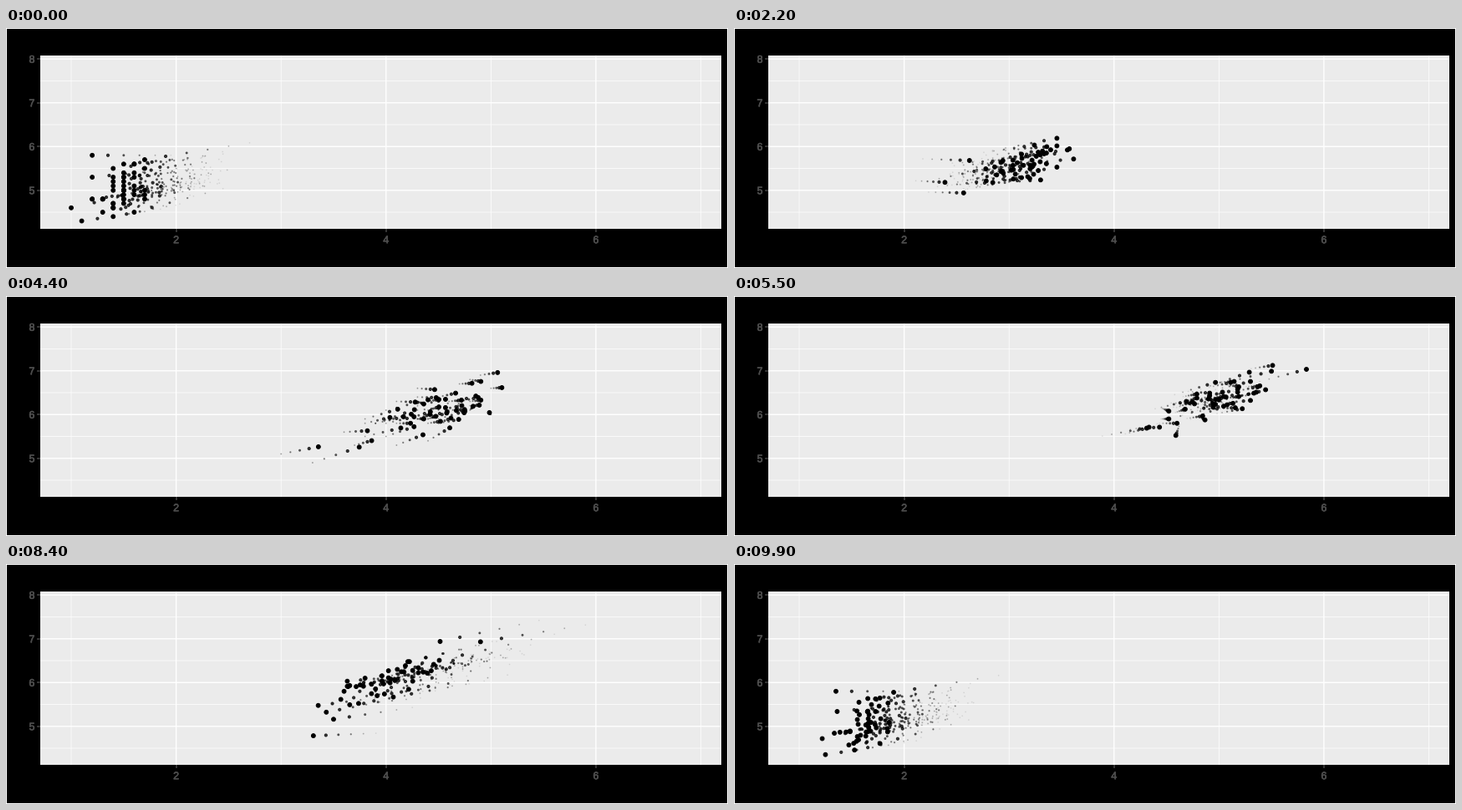
A matplotlib script for the animation above (10000 ms loop, 864 by 288 pixels).

```python
import numpy as np
import matplotlib.pyplot as plt
from matplotlib.animation import FuncAnimation
from matplotlib.patches import Rectangle
from matplotlib.patheffects import withStroke

W, H, DPI = 864, 288, 96
FRAMES, INTERVAL = 100, 100
LEFT, TOP, RIGHT, BOTTOM = 41, 33, 856, 241
COUNT = 50
WAKE = 5          # trailing copies behind each point
MOVES = ((6, 33), (40, 67), (74, 100))
GREY = "#4d4d4d"

plt.rcParams["font.family"] = "Liberation Sans"
rng = np.random.default_rng(4)


def cloud(mean, spread, corr, rim):
    """Correlated points on a 0.1 grid, after the outlying ones in rim."""
    u, v = rng.normal(size=(2, COUNT - len(rim))).clip(-1.8, 1.8)
    v = corr * u + np.sqrt(1 - corr ** 2) * v
    core = np.array(mean) + np.column_stack([u, v]) * spread
    return np.vstack([rim, core.round(1)])


# The rim points keep their order from pose to pose
low = cloud((1.48, 5.0), (0.13, 0.31), 0.2,
            [(1.2, 5.8), (1.1, 4.3), (1.0, 4.6), (1.7, 5.7),
             (1.4, 4.6), (1.5, 5.4), (1.5, 5.3), (1.5, 5.0)])
middle = cloud((4.32, 5.97), (0.38, 0.48), 0.7,
               [(3.6, 5.6), (4.7, 6.1), (4.0, 6.1), (4.5, 6.2),
                (4.7, 6.3), (3.9, 5.8), (3.0, 5.1), (3.3, 4.9)])
high = cloud((5.5, 6.54), (0.42, 0.46), 0.75,
             [(5.1, 5.8), (5.0, 5.7), (6.7, 7.7), (6.9, 7.7),
              (4.5, 4.9), (6.4, 7.9), (5.4, 6.2), (6.3, 7.3)])
POSES = (low, middle, high, low)


def points_at(n):
    """Rest at a pose, then glide linearly to the next one."""
    n %= FRAMES
    for i, (start, end) in enumerate(MOVES):
        if n <= end:
            t = max(0, (n - start) / (end - start))
            return POSES[i] + (POSES[i + 1] - POSES[i]) * t


def stack_at(n):
    """Oldest trailing copy first, the current points on top."""
    return np.vstack([points_at(n - k) for k in range(WAKE, -1, -1)])


fig = plt.figure(figsize=(W / DPI, H / DPI), dpi=DPI, facecolor="black")
ax = fig.add_axes([LEFT / W, 1 - BOTTOM / H,
                   (RIGHT - LEFT) / W, (BOTTOM - TOP) / H],
                  facecolor="#ebebeb")
ax.set(xlim=(0.705, 7.195), ylim=(4.12, 8.08),
       xticks=(2, 4, 6), yticks=(5, 6, 7, 8))
ax.spines[:].set_visible(False)
ax.tick_params(length=2.75, width=1.5, color="#333333",
               labelcolor=GREY, labelsize=9.4)
ax.tick_params(axis="x", pad=3.4)
ax.tick_params(axis="y", pad=2.2)
for label in ax.get_xticklabels() + ax.get_yticklabels():
    label.set_path_effects([withStroke(linewidth=0.5, foreground=GREY)])


def grid(xs, ys, width):
    style = dict(color="white", lw=width, snap=False, zorder=1)
    for x in xs:
        ax.axvline(x, **style)
    for y in ys:
        ax.axhline(y, **style)


grid(np.arange(1, 8, 2), np.arange(4.5, 8), 0.53)
grid(np.arange(2, 7, 2), np.arange(5, 9), 1.07)

# One-pixel white frame around the stage
for x, y, w, h in ((0, 0, W, 1), (0, H - 1, W, 1),
                   (0, 0, 1, H), (W - 1, 0, 1, H)):
    fig.add_artist(Rectangle((x / W, y / H), w / W, h / H,
                             transform=fig.transFigure,
                             fc="white", lw=0))

# Trailing copies shrink faster than they fade
age = np.repeat(np.arange(WAKE, -1, -1), COUNT)
fade = 1 - age / (WAKE + 1)
diameter = 0.7 * (4.268 * fade ** 3 + 0.945)
ink = np.zeros((len(fade), 4))
ink[:, 3] = fade ** 1.5
dots = ax.scatter(*stack_at(0).T, s=diameter ** 2, facecolors=ink,
                  edgecolors=ink, linewidths=0.709, zorder=3)


def update(n):
    dots.set_offsets(stack_at(n))
    return (dots,)


anim = FuncAnimation(fig, update, frames=FRAMES, interval=INTERVAL,
                     repeat=True, repeat_delay=0, blit=False)
plt.show()
```
